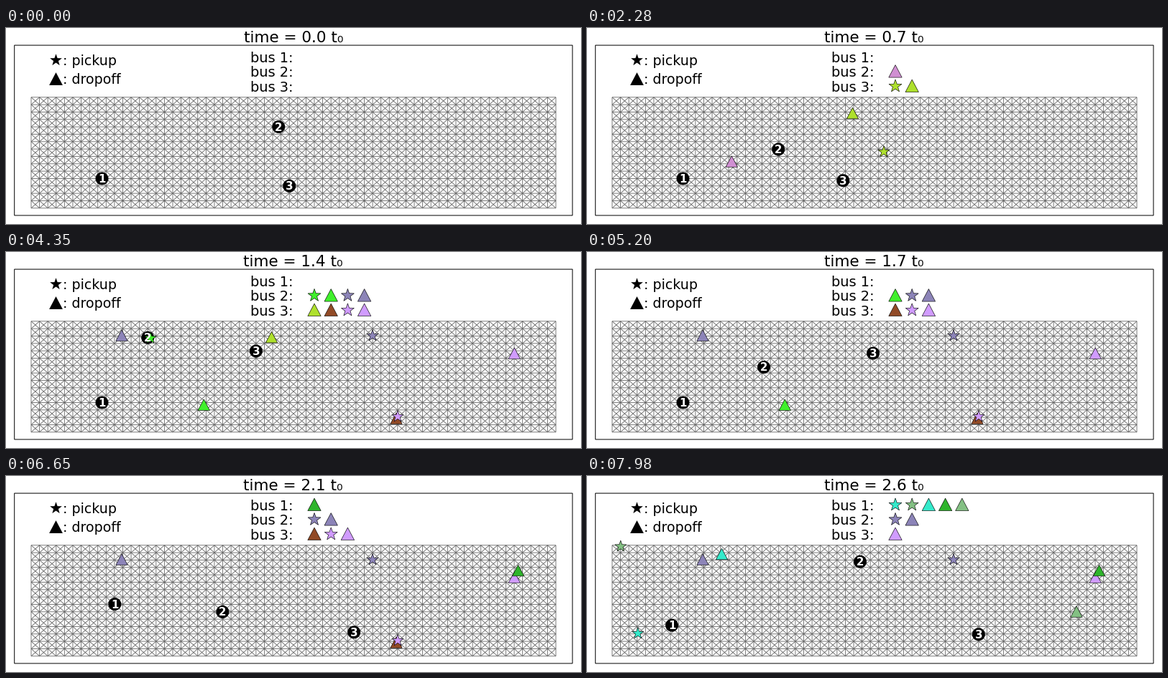
These frames come from a looping animation (800 px wide and 274 px high, 8 s). A matplotlib script:

```python
import numpy as np
import matplotlib.pyplot as plt
from matplotlib.animation import FuncAnimation
from matplotlib.collections import LineCollection
from matplotlib.patches import Circle, Polygon, Rectangle

W, H, DPI = 800, 274, 100
PX = 72 / DPI                      # points per pixel
FRAMES, INTERVAL = 320, 25
COLS, ROWS = 63, 15
X0, Y0, X1, Y1 = 35, 251.8, 765, 96.8
DX, DY = (X1 - X0) / COLS, (Y0 - Y1) / ROWS
SPEED = 1.99                       # pixels per frame
NEVER = 10 ** 6

plt.rcParams["font.family"] = "DejaVu Sans"
fig = plt.figure(figsize=(W / DPI, H / DPI), dpi=DPI, facecolor="white")
ax = fig.add_axes([0, 0, 1, 1])
ax.set_xlim(0, W)
ax.set_ylim(H, 0)
ax.axis("off")


def to_px(points):
    p = np.asarray(points, float)
    return np.column_stack([X0 + p[:, 0] * DX, Y0 - p[:, 1] * DY])


def star(x, y, r):
    a = -np.pi / 2 + np.arange(10) * np.pi / 5
    rad = np.where(np.arange(10) % 2, 0.4 * r, r)
    return np.column_stack([x + rad * np.cos(a), y + rad * np.sin(a)])


def triangle(x, y, r):
    return np.array([(x, y - r), (x + r, y + 0.9 * r), (x - r, y + 0.9 * r)])


def label(x, y, text, px, **kw):
    return ax.text(x, y, text, fontsize=px * PX, va="baseline", **kw)


def draw_grid():
    lines = [[(i, 0), (i, ROWS)] for i in range(COLS + 1)]
    lines += [[(0, j), (COLS, j)] for j in range(ROWS + 1)]
    for k in range(1 - ROWS, COLS):
        a, b = max(k, 0), min(k + ROWS, COLS)
        lines.append([(a, a - k), (b, b - k)])
        lines.append([(a, ROWS - a + k), (b, ROWS - b + k)])
    ax.add_collection(LineCollection([to_px(s) for s in lines], snap=False,
                                     colors="0.4", linewidths=0.85 * PX))


def draw_legend():
    ax.add_patch(Rectangle((11.7, 24.1), 776.4, 237.9, fill=False, ec="black",
                           lw=PX, snap=False))
    ax.add_patch(Polygon(star(69.5, 45, 8.8), fc="black", ec="none"))
    ax.add_patch(Polygon(triangle(69.5, 71.5, 9.4), fc="black", ec="none"))
    label(79, 51.5, ": pickup", 19)
    label(79, 78.5, ": dropoff", 19)
    for i in range(3):
        label(339.5, 47.5 + 20.6 * i, f"bus {i + 1}:", 19.4)


# Each bus has legs: a start frame and the lattice nodes it then passes.
LEGS = [
    [(242, [(8.5, 4), (8, 4), (8, 5), (12, 9), (6, 3)])],
    [(21, [(29.71, 11), (29, 11), (28, 12), (23, 12), (23, 11), (19, 7),
           (14, 7)]),
     (144, [(14, 7), (14, 13), (21, 6), (21, 3), (21, 4), (31, 14)])],
    [(20.4, [(31, 3), (30, 2), (30, 0), (29, 1), (25, 1), (31, 7), (33, 7),
             (30, 10), (27, 10), (27, 11), (29, 13), (40, 2), (44, 2)]),
     (298.5, [(44, 2), (43, 1), (44, 2), (44, 5)])],
]


def bus_position(legs, n):
    start, nodes = [leg for i, leg in enumerate(legs) if i == 0 or n >= leg[0]][-1]
    p = to_px(nodes)
    dist = np.concatenate([[0], np.cumsum(np.hypot(*np.diff(p, axis=0).T))])
    s = max(n - start, 0) * SPEED
    return np.interp(s, dist, p[:, 0]), np.interp(s, dist, p[:, 1])


# name: colour, frame asked, pickup place, dropoff place
REQUESTS = {
    "pink": ("#ff9db2", 21, (384, 249), (330, 242)),
    "plum": ("#d08fd2", 22, (301.5, 136), (201.3, 187)),
    "lime": ("#aee02c", 64, (413, 173), (369.5, 119.5)),
    "brown": ("#914a26", 126, (349, 147), (543, 233)),
    "green": ("#40f02c", 144, (201, 120.5), (275.3, 214)),
    "slate": ("#8c84b8", 155, (510, 117), (161, 117)),
    "violet": ("#d09bff", 165, (545, 230), (707.3, 142)),
    "leaf": ("#2fb52c", 242, (131, 202), (712.5, 132.5)),
    "sage": ("#83c083", 270, (46.8, 98.5), (681, 190)),
    "aqua": ("#34eacb", 281, (70.8, 220), (187.5, 109.5)),
}

# Stops of each bus in the order of visit: name, is pickup, frame of visit
STOPS = [
    [("leaf", 1, 250), ("aqua", 1, NEVER), ("sage", 1, NEVER),
     ("aqua", 0, NEVER), ("leaf", 0, NEVER), ("sage", 0, NEVER)],
    [("plum", 1, 68), ("plum", 0, 128), ("green", 1, 175), ("green", 0, 245),
     ("slate", 1, NEVER), ("slate", 0, NEVER)],
    [("pink", 1, 39), ("pink", 0, 70), ("lime", 1, 129), ("brown", 1, 169),
     ("lime", 0, 190), ("brown", 0, 307), ("violet", 1, 315),
     ("violet", 0, NEVER)],
]


class Stop:
    def __init__(self, name, pickup, visit):
        color, self.asked, *places = REQUESTS[name]
        self.visit = visit
        self.shape = star if pickup else triangle
        self.size = 9.4 if pickup else 9.2
        x, y = places[0 if pickup else 1]
        style = dict(fc=color, ec="black", lw=0.6 * PX, visible=False)
        order = 3 + list(REQUESTS).index(name) / 100
        self.mark = Polygon(self.shape(x, y, self.size - 1), zorder=order, **style)
        self.item = Polygon(self.shape(0, 0, self.size), zorder=3, **style)
        ax.add_patch(self.mark)
        ax.add_patch(self.item)

    def update(self, n, slot, row):
        shown = self.asked <= n < self.visit
        self.mark.set_visible(shown)
        self.item.set_visible(shown)
        if shown:
            self.item.set_xy(self.shape(429 + 23.2 * slot, 40.3 + 20.5 * row,
                                        self.size))
        return shown


draw_grid()
draw_legend()
title = label(399.7, 19.8, "", 21.5, ha="center")
queues = [[Stop(*s) for s in stops] for stops in STOPS]
discs = [ax.add_patch(Circle((0, 0), 9, fc="black", ec="none", zorder=2))
         for _ in LEGS]
digits = [label(0, 0, str(i + 1), 15, color="white", weight="bold",
                ha="center", zorder=5) for i in range(len(LEGS))]


def update(n):
    title.set_text(f"time = {(n + 1) * 0.008:.1f} t\u2080")
    for row, legs in enumerate(LEGS):
        x, y = bus_position(legs, n)
        discs[row].center = (x, y)
        digits[row].set_position((x, y + 5.5))
        slot = 0
        for stop in queues[row]:
            slot += stop.update(n, slot, row)
    return [title, *discs, *digits]


anim = FuncAnimation(fig, update, frames=FRAMES, interval=INTERVAL,
                     repeat=True, repeat_delay=0, blit=False)
plt.show()
```
